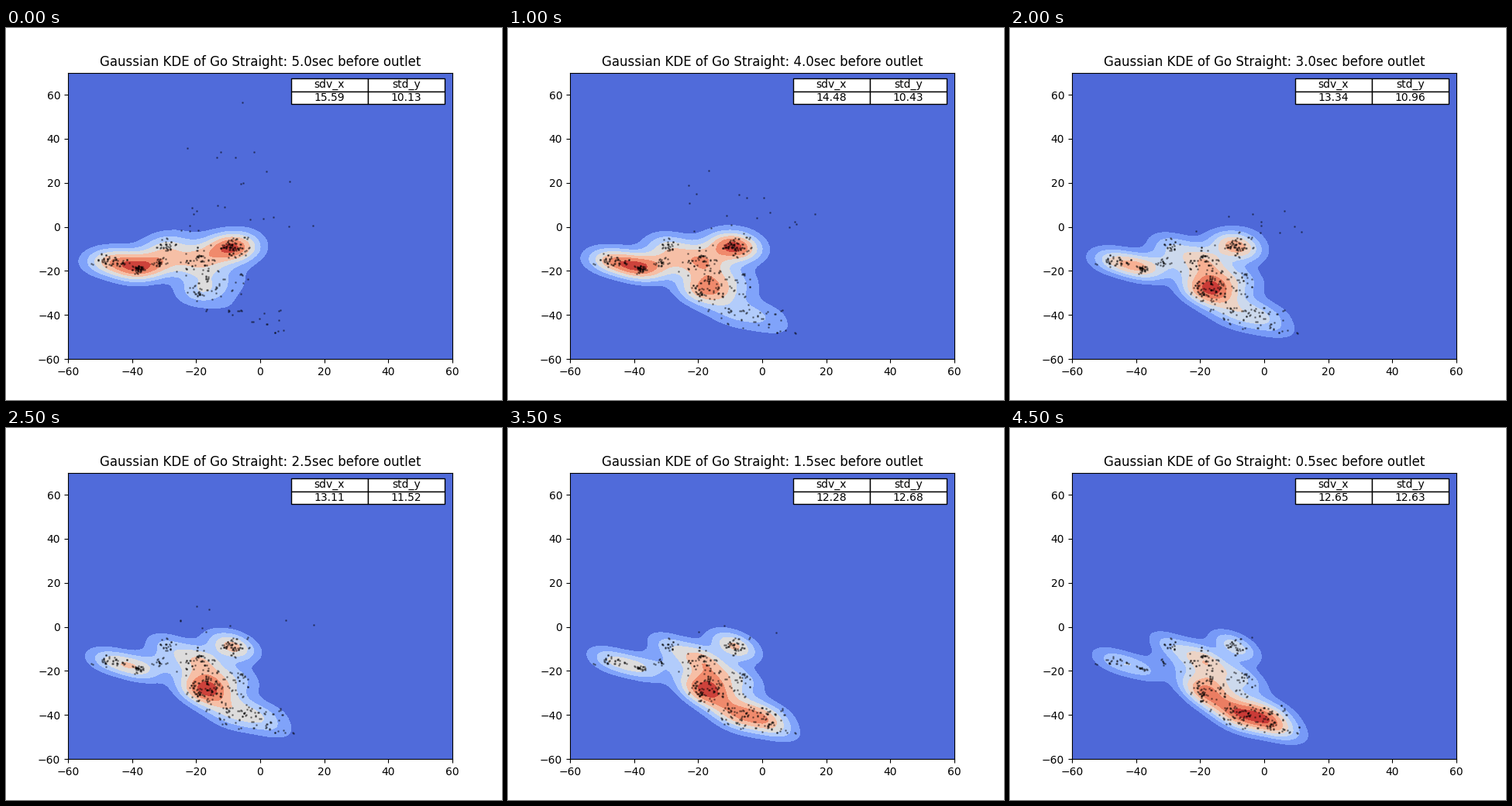
These frames come from a looping animation (640x480 px, 5000 ms). A matplotlib script:

```python
import numpy as np
import matplotlib.pyplot as plt
from matplotlib.animation import FuncAnimation

FRAMES, INTERVAL = 10, 500

# Each stream of walkers: start point, end point, spread,
# head count at the start, middle and end of the loop
STREAMS = [
    ((-50, -15), (-42, -16.5), 1.4, (60, 42, 24)),
    ((-38.5, -18.5), (-37, -19.5), 1.0, (52, 34, 15)),
    ((-32, -16.7), (-30.5, -16), 1.0, (30, 18, 8)),
    ((-30, -9.5), (-28.5, -6.5), 1.5, (35, 24, 20)),
    ((-24, -15.5), (-15, -12), 2.5, (55, 55, 48)),
    ((-10, -8.5), (-7.5, -9.5), 2.2, (88, 64, 36)),
    ((-17, -22), (-15, -33), 2.8, (36, 95, 50)),
    ((-22, -25), (-18, -34), 1.7, (20, 36, 42)),
    ((-8, -23), (-6, -28), 2.4, (12, 32, 34)),
    ((-11, -38), (-4, -42), 2.4, (8, 50, 80)),
    ((-1, -44), (8.5, -47), 1.7, (10, 20, 40)),
    ((1, -36), (4, -41), 2.2, (3, 12, 32)),
]

# Values printed in the table
STD_X = [15.59, 15.08, 14.48, 13.73, 13.34, 13.11, 13.27, 12.28, 12.41, 12.65]
STD_Y = [10.13, 10.31, 10.43, 10.5, 10.96, 11.52, 12.44, 12.68, 12.62, 12.63]
BANDS = [7, 7, 7, 8, 8, 7, 8, 7, 7, 8]

gx, gy = np.meshgrid(np.linspace(-60, 60, 121), np.linspace(-60, 70, 131))
rng = np.random.default_rng(7)


def make_pool(start, end, spread, size):
    """Walkers spread evenly along a stream, every third close to another."""
    along = (np.arange(size) * 0.618034 + 0.5) % 1
    pool = np.outer(1 - along, start) + np.outer(along, end)
    pool += spread * np.clip(rng.normal(size=(size, 2)), -2, 2)
    near = pool[1::3]
    near[:] = pool[::3][:len(near)] + rng.normal(scale=0.25, size=near.shape)
    return pool


POOLS = [make_pool(a, b, s, max(n)) for a, b, s, n in STREAMS]


def strays(i):
    """Walkers far from the crowd; fewer and nearer with each step."""
    r = np.random.default_rng(20 + i)
    n = round(24 * max(0, 1 - i / 8))
    return np.column_stack([r.uniform(-25, 17, n),
                            r.exponential(14 * 0.75**i, n) - 3])


def walkers(i):
    mid = (FRAMES - 1) / 2
    parts = [pool[:round(np.interp(i, [0, mid, 2 * mid], heads))]
             for pool, (*_, heads) in zip(POOLS, STREAMS)]
    return np.vstack(parts + [strays(i)])


def density(points):
    """Gaussian KDE with Scott's bandwidth, not normalised."""
    cov = np.cov(points.T) * len(points) ** (-1 / 3)
    (a, b), (_, c) = np.linalg.inv(cov)
    z = np.zeros_like(gx)
    for x, y in points:
        dx, dy = gx - x, gy - y
        z += np.exp(-(a * dx**2 + 2 * b * dx * dy + c * dy**2) / 2)
    return z


fig, ax = plt.subplots(figsize=(6.4, 4.8), dpi=100)


def draw(i):
    ax.clear()
    points, bands = walkers(i), BANDS[i]
    z = density(points)
    z *= (bands - 0.4) / z.max()
    ax.contourf(gx, gy, z, levels=np.arange(bands + 1), cmap="coolwarm")
    ax.plot(*points.T, "k.", markersize=2, alpha=0.35)
    table = ax.table(cellText=[[STD_X[i], STD_Y[i]]], colLabels=["sdv_x", "std_y"],
                     colWidths=[0.2, 0.2], cellLoc="center", loc="upper right")
    table.set_zorder(5)
    ax.set_xlim(-60, 60)
    ax.set_ylim(-60, 70)
    ax.set_title(f"Gaussian KDE of Go Straight: {5 - i / 2:.1f}sec before outlet")
    return []


anim = FuncAnimation(fig, draw, frames=FRAMES, interval=INTERVAL,
                     repeat=True, repeat_delay=0)
plt.show()
```
